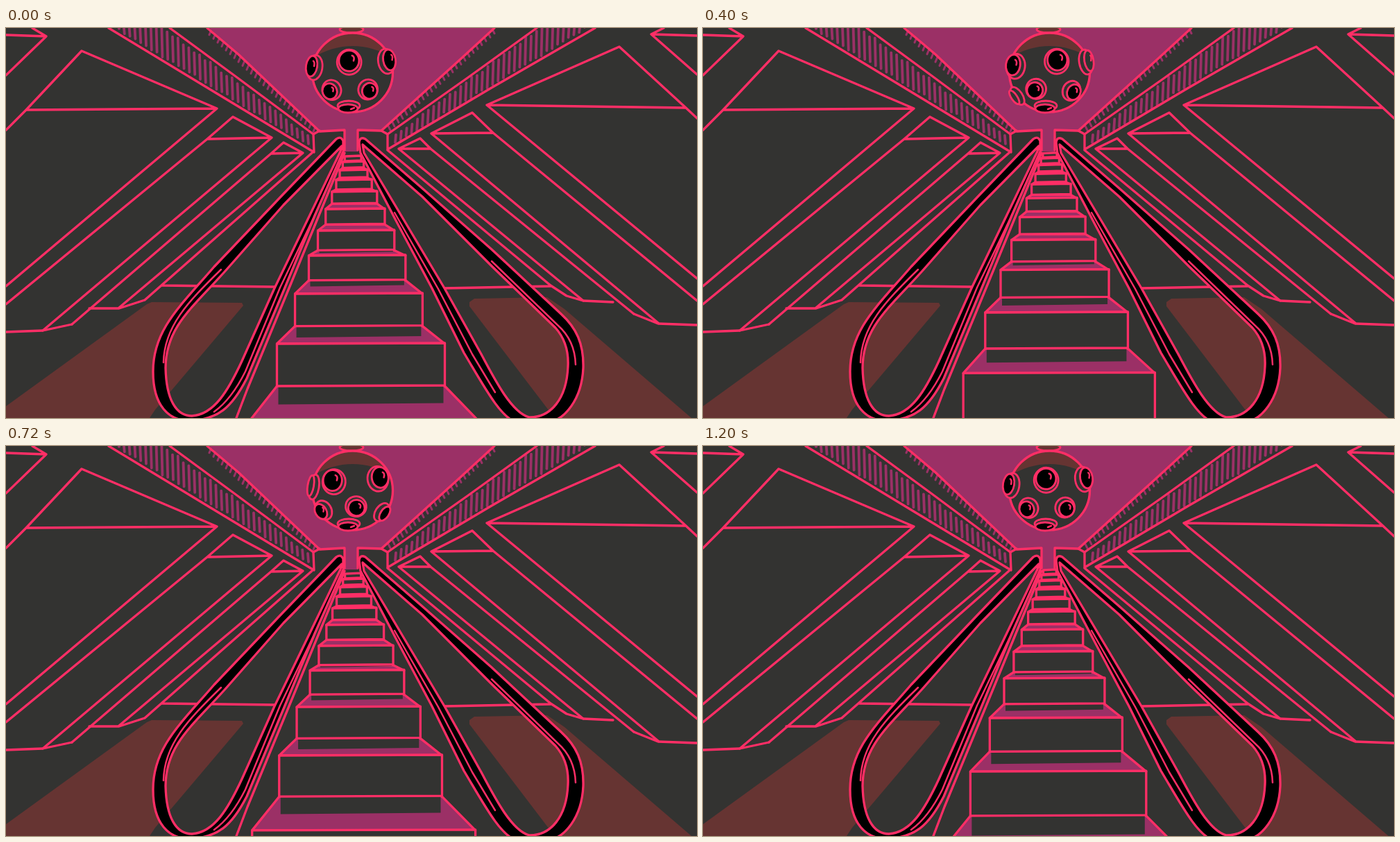
Write an HTML page with a canvas that moves like this. It is 996 by 562 pixels and loops after 1.28 s.

```html
<!DOCTYPE html>
<html lang="en">
<head>
<meta charset="utf-8">
<title>Escalator</title>
<style>
html, body { margin: 0; width: 100%; height: 100%; overflow: hidden; background: #333331; }
canvas { display: block; width: 996px; height: 562px; }
</style>
</head>
<body>
<canvas id="stage" width="996" height="562"></canvas>
<script>
const ctx = document.getElementById('stage').getContext('2d');
const STEP = 80, STEPS = 16, RISE_STEPS = 8;
const DARK = '#333331', PURPLE = '#9b3066', PINK = '#ff2e66', BROWN = '#663432', BLACK = '#000';

const clamp = (v, lo, hi) => Math.min(Math.max(v, lo), hi);
const shape = d => new Path2D(d);

function fill(path, color, rule = 'nonzero') {
  ctx.fillStyle = color;
  ctx.fill(path, rule);
}

function ink(path, color = PINK, width = 3.3) {
  ctx.strokeStyle = color;
  ctx.lineWidth = width;
  ctx.stroke(path);
}

function oval(x, y, rx, ry, tilt, color) {
  const path = new Path2D();
  path.ellipse(x, y, rx, ry, tilt, 0, Math.PI * 2);
  fill(path, color);
  ink(path, PINK, 2.8);
}

function seeded(seed) {
  return () => (seed = (seed * 16807) % 2147483647) / 2147483647;
}

function floor() {
  fill(shape('M0 545 L203 398 L210 395 L340 396 L342 400 L215 550 L207 562 H0 Z'), BROWN);
  fill(shape('M668 395 L675 390 L780 388 L805 405 L988 562 H790 L780 548 L668 401 Z'), BROWN);
}

// Purple dashes of the ledges, drawn on both sides of the hall
function dash(x, top, end, lean, width) {
  ink(shape(`M${x} ${top} L${x + lean} ${end} M${997 - x} ${top - 1} L${997 - x - lean} ${end - 2}`), PURPLE, width);
}

function ceiling() {
  const rand = seeded(7);
  fill(shape('M293 0 L452 148 H488 V178 H507 V148 H541 L702 0 Z'), PURPLE);
  for (let x = 162; x < 440; x += 7.8) {
    const top = Math.max(-2, (x - 236) * 0.74 + 5 + rand() * 5);
    const end = (x - 148) * 0.605 - 4 - rand() * 4;
    if (end > top) dash(x, top, end, 1, 3.8);
  }
  for (let x = 296; x < 448; x += 6) {
    const y = (x - 293) * 0.93;
    dash(x, y, y + 7, -3, 3);
  }
  ink(shape('M290 0 L335 38 L452 149 L488 147 V176 M704 0 L655 45 L541 148 L507 147 V176'));
  ink(shape('M236 0 L330 69 L443 153 L452 148 M765 0 L665 72 L550 153 L541 148'));
  ink(shape('M148 0 L300 92 L444 179 L443 153 M849 0 L700 86 L550 175 V153'));
}

// A slanted block: a triangular top with two long edges running down to the floor
function block(apex, tip, back, foot, tipFoot) {
  ink(shape(`M${foot} L${back} L${apex} L${tip} L${tipFoot} M${back} L${tip}`));
}

function walls() {
  ink(shape('M0 10 L58 12 L0 68 M38 0 L58 12'));
  block('109 33', '304 116', '29 118', '0 147', '0 372');
  block('327 128', '383 158', '290 160', '0 398', '53 436');
  block('400 165', '428 180', '382 181', '95 427', '163 403');
  ink(shape('M441 180 L200 392 M0 438 L53 436 L95 427 M120 404 H163 L200 392 M225 371 L389 373'));

  ink(shape('M948 0 L930 9 L996 11 M930 9 L996 67'));
  block('884 27', '693 111', '980 115', '996 130', '996 361');
  block('672 122', '613 152', '702 151', '996 393', '940 425');
  block('597 159', '566 174', '612 174', '905 412', '832 393');
  ink(shape('M550 176 L785 371 L808 386 L832 393 L875 395 M996 428 L940 426 L905 412 M632 375 L785 372'));
}

function rail(outer, inner, glint) {
  fill(shape(outer + inner), BLACK, 'evenodd');
  ink(shape(outer + inner));
  ink(shape(glint), PINK, 2.5);
}

function rails() {
  rail(
    'M486 178 V163 Q483 155 476 160 L400 239 L300 344 C250 402 212 435 212 495 C212 545 235 566 265 566 C305 564 325 548 347 505 L402 374 L446 268 Z',
    'M482 178 L484 170 L400 255 L318 348 C270 402 230 430 230 490 C231 535 245 559 268 559 C300 557 320 523 340 480 L387 375 L445 255 Z',
    'M446 268 L395 374 L345 495 Q325 535 300 553 M310 348 C262 395 228 430 227 482');
  ink(shape('M488 180 L410 370 L348 520 L332 562'));
  rail(
    'M511 180 L509 165 Q510 156 518 160 L600 231 L700 319 L800 412 C822 432 833 455 832 490 C830 535 805 566 780 568 H735 C712 560 690 518 660 468 L614 375 L565 283 Z',
    'M516 180 L514 168 L600 243 L700 343 L792 432 C808 450 811 470 810 488 C808 535 785 561 755 561 C730 556 705 508 685 470 L632 375 Z',
    'M560 266 L623 376 L672 470 L705 525 M700 336 L795 428 Q820 450 821 485');
}

// Front edge heights of the stairs at rest, nearest first
const HEIGHTS = [700, 568, 455, 383, 328, 292, 261, 236, 219, 205, 193, 185, 178];

function stair(n, rise) {
  const y = HEIGHTS[n] + (HEIGHTS[n + 1] - HEIGHTS[n]) * rise;
  const sill = y + 6 + Math.max(0, y - 180) * 0.2;
  return {
    y, sill,
    left: 481 - (y - 205) * 0.362,
    right: 521 + (y - 205) * 0.446,
    shade: sill + (y - 265) * 0.14
  };
}

function stairs(step) {
  const rise = (step % RISE_STEPS) / RISE_STEPS;
  for (let n = HEIGHTS.length - 2; n > 0; n--) {
    const { y, left, right, sill, shade } = stair(n, rise), next = stair(n - 1, rise);
    const low = Math.min(sill, next.y);
    const tread = shape(`M${left} ${low} L${next.left} ${next.y} H${next.right} L${right} ${low} Z`);
    const front = shape(`M${left} ${y} L${right} ${y - 1} V${low - 1} L${left} ${low} Z`);
    fill(tread, PURPLE);
    ink(tread);
    if (shade > low) fill(shape(`M${left + 2} ${low} V${shade} L${right - 2} ${shade - 2} V${low} Z`), DARK);
    fill(front, DARK);
    ink(front);
  }
}

// Two rings of five lenses turn around the ball
const UPPER = { reach: 59, size: 14.5, tall: 15, lean: -0.17, drop: 2, y: a => 52 - 4.5 * Math.sin(a) - 5 * Math.cos(a) };
const LOWER = { reach: 49, size: 12, tall: 11.5, lean: 0.6, drop: -2, y: a => 99 - 10 * Math.cos(a) };

function lens(ring, degrees) {
  if (Math.abs(degrees) > 103) return;
  const a = degrees * Math.PI / 180, side = Math.sin(a);
  const x = 497.5 + ring.reach * side, y = ring.y(a);
  const rx = ring.size * (0.4 + 0.6 * Math.cos(a)), ry = ring.tall;
  const tilt = ring.lean * side;
  oval(x - 4.5 * side, y + ring.drop, rx + 3, ry + 3, tilt, DARK);
  oval(x, y, rx, ry, tilt, Math.abs(degrees) > 84 ? DARK : BLACK);
  if (rx > 6) ink(shape(`M${x + rx * 0.3} ${y - ry * 0.5} q${rx * 0.3} ${ry * 0.1} ${rx * 0.15} ${ry * 0.5}`), PINK, 2.5);
}

function ball(step) {
  oval(498, 2, 17, 5, 0, BROWN);
  const body = new Path2D();
  body.ellipse(499.5, 64, 58, 57, 0, 0, Math.PI * 2);
  fill(body, DARK);
  ctx.save();
  ctx.clip(body);
  fill(shape('M440 0 V44 Q499 8 560 44 V0 Z'), BROWN);
  ctx.restore();
  ink(body);
  const turn = 72 * clamp((step - 3) / 9, 0, 1);
  for (let k = -2; k <= 1; k++) {
    lens(UPPER, turn - 3 + 72 * k);
    lens(LOWER, turn + 33 + 72 * k);
  }
  lens(UPPER, turn + 141);
  oval(494, 112, 16, 7, 0, DARK);
  oval(493, 116, 14, 6, 0, BLACK);
  ink(shape('M497 117 L502 115'), PINK, 2.5);
}

function draw(step) {
  ctx.lineJoin = ctx.lineCap = 'round';
  ctx.fillStyle = DARK;
  ctx.fillRect(0, 0, 996, 562);
  floor();
  ceiling();
  walls();
  stairs(step);
  rails();
  ball(step);
}

let shown = -1;
function tick() {
  const step = Math.floor(performance.now() / STEP) % STEPS;
  if (step !== shown) draw(shown = step);
  requestAnimationFrame(tick);
}
tick();
</script>
</body>
</html>
```
